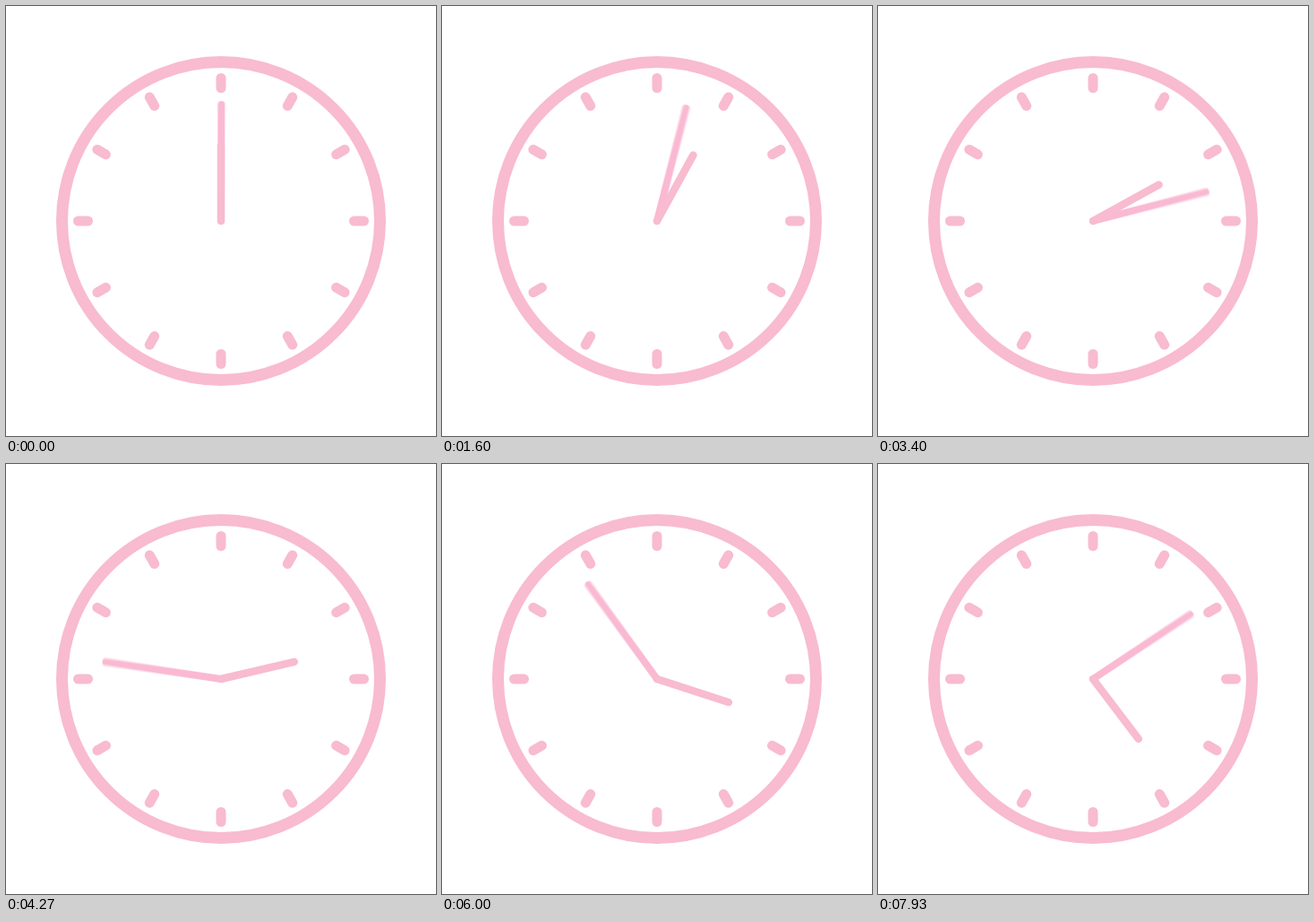
Recreate the animation shown at these times as an HTML page with a canvas. Size 480x480 px, loop 8 s.

```html
<!DOCTYPE html>
<html lang="en">
<head>
<meta charset="utf-8">
<title>Clock</title>
<style>
  html, body { margin: 0; width: 100%; height: 100%; overflow: hidden; background: #fff; }
  canvas { display: block; width: 100vmin; height: 100vmin; }
</style>
</head>
<body>
<canvas width="480" height="480"></canvas>
<script>
const ctx = document.querySelector('canvas').getContext('2d');
const LOOP = 8000;
const FPS = 15;
const HOUR_STEP = 360 / (20 * FPS);   // degrees per frame
const MINUTE_STEP = HOUR_STEP * 13;
const BLUR_SAMPLES = 5;
const BLUR_SWEEP = 1.3;               // degrees

ctx.strokeStyle = '#f8bbd0';
ctx.lineCap = 'round';

// Line along a clock angle, between two distances from the centre.
function spoke(degrees, from, to, width) {
  ctx.save();
  ctx.rotate(degrees * Math.PI / 180);
  ctx.lineWidth = width;
  ctx.beginPath();
  ctx.moveTo(0, -from);
  ctx.lineTo(0, -to);
  ctx.stroke();
  ctx.restore();
}

function minuteHand(degrees) {
  ctx.save();
  ctx.globalCompositeOperation = 'lighter';
  ctx.globalAlpha = 1 / BLUR_SAMPLES;
  for (let i = 0; i < BLUR_SAMPLES; i++) {
    const offset = (i / (BLUR_SAMPLES - 1) - 0.5) * BLUR_SWEEP;
    spoke(Math.max(0, degrees + offset), 0, 130, 8);
  }
  ctx.restore();
}

function face() {
  ctx.lineWidth = 13;
  ctx.beginPath();
  ctx.arc(0, 0, 177.5, 0, Math.PI * 2);
  ctx.stroke();
  for (let hour = 0; hour < 12; hour++) spoke(hour * 30, 148.5, 159.5, 11);
}

function draw(time) {
  // Steps at 15 fps, with boundaries rounded to 10 ms.
  const ticks = Math.floor((time % LOOP) / 10) * 10;
  const frame = Math.floor((ticks + 3.4) * FPS / 1000);
  ctx.setTransform(1, 0, 0, 1, 240, 240);
  ctx.clearRect(-240, -240, 480, 480);
  minuteHand(frame * MINUTE_STEP);
  spoke(frame * HOUR_STEP, 0, 84, 8.5);
  face();
}

const start = performance.now();
function loop() {
  draw(performance.now() - start);
  requestAnimationFrame(loop);
}
loop();
</script>
</body>
</html>
```
